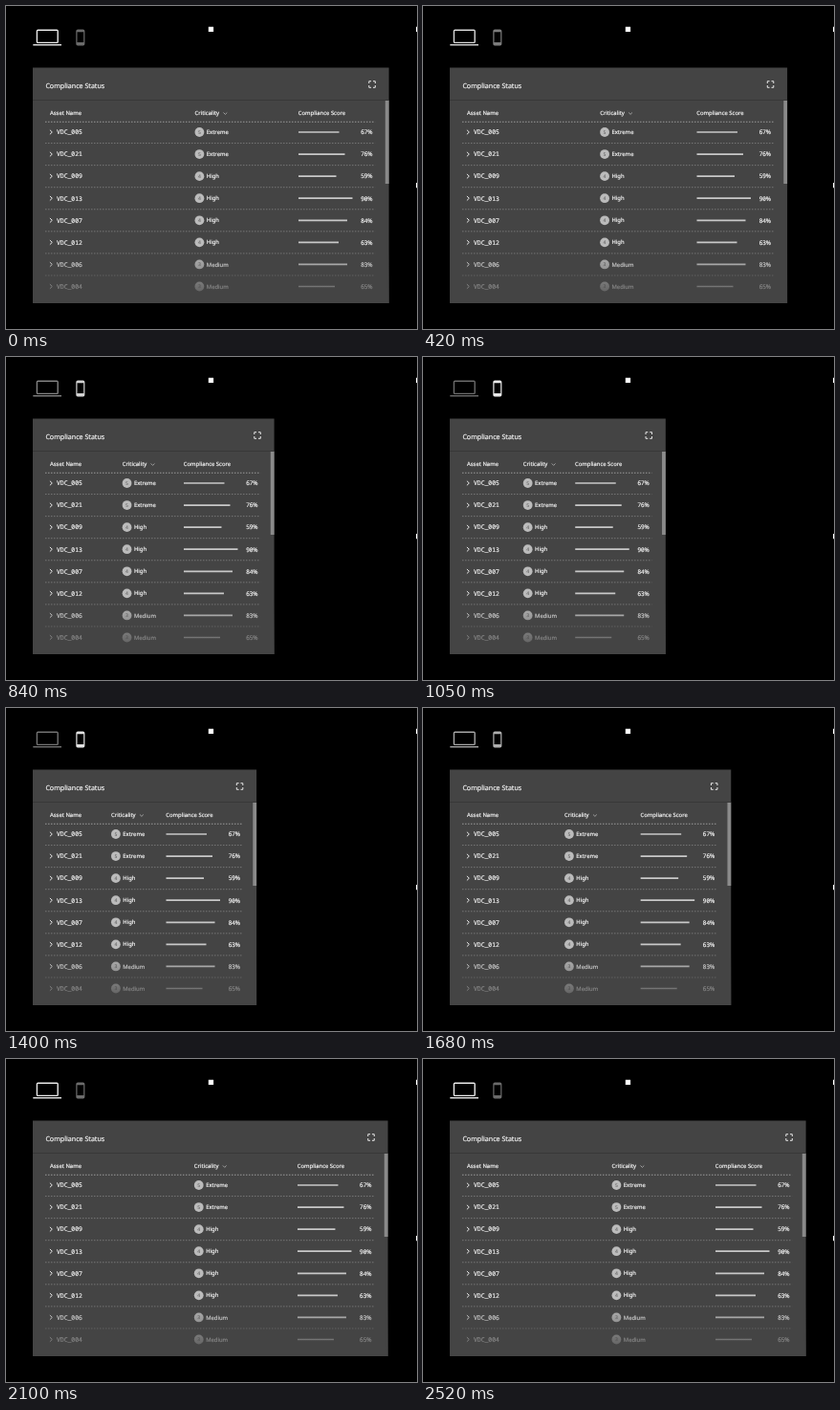
An HTML page that plays this animation: 430x338 px, repeating every 2590 ms.

```html
<!DOCTYPE html>
<html lang="en">
<head>
<meta charset="utf-8">
<title>Responsive compliance table</title>
<style>
  html, body { margin: 0; width: 100%; height: 100%; overflow: hidden; background: #000; }
  svg { display: block; width: 430px; height: 338px; --p: 0; }
  text {
    font: 5.9px "Noto Sans", sans-serif; text-rendering: geometricPrecision;
    fill: #f2f2f2; stroke: #f2f2f2; stroke-width: .2;
  }
  .title { font-size: 7.1px; font-weight: 500; }
  .asset { font: 6.4px "Noto Sans Mono", monospace; }
  .percent { font-size: 6.3px; text-anchor: end; font-feature-settings: "zero"; }
  .digit { font-size: 5px; text-anchor: middle; fill: #555; stroke: none; }
  .line { fill: none; stroke: #f0f0f0; stroke-width: .95; }
  .sort { stroke: #aaa; stroke-width: .9; }
  .bar { stroke: #c8c8c8; stroke-width: 1.7; }
  .rule { stroke: #7c7c7c; stroke-width: .9; stroke-dasharray: 1.5 1.5; }
  .rule.head { stroke: #999; stroke-width: 1.1; }
  .middle { transform: translateX(calc(var(--p) * -93.4px)); }
  .right { transform: translateX(calc(var(--p) * -147.8px)); }
  .laptop { opacity: calc(.92 - .5 * var(--p)); }
  .phone { opacity: calc(.42 + .5 * var(--p)); }
</style>
</head>
<body>
<svg id="stage" viewBox="0 0 430 338">
  <defs>
    <linearGradient id="fade" x1="0" y1="0" x2="0" y2="1">
      <stop offset="0" stop-color="#444" stop-opacity="0"/>
      <stop offset="1" stop-color="#444" stop-opacity=".92"/>
    </linearGradient>
  </defs>
  <path fill="#fff" d="M211.8 21.8h5.3v5.3h-5.3zM429 21.8h1v5.3h-1zM429 185h1v5.3h-1z"/>
  <g class="laptop" fill="none" stroke="#fff" stroke-width="1.4">
    <rect x="32.4" y="25.2" width="21.8" height="13.2" rx="1"/>
    <path d="M28.3 40.7H58"/>
  </g>
  <path class="phone" fill="#fff" fill-rule="evenodd"
    d="M75.1 24.5h5.5q1.8 0 1.8 1.8v13.4q0 1.8-1.8 1.8h-5.5q-1.8 0-1.8-1.8V26.3q0-1.8 1.8-1.8zM74.5 27.3v10.8h6.7V27.3z"/>
  <rect class="panel" x="28" y="64.5" height="246.5" fill="#444"/>
  <rect class="panel" x="28" y="98" height="1" fill="#383838"/>
  <text class="title" x="41.4" y="85.9">Compliance Status</text>
  <text x="46" y="114.2">Asset Name</text>
  <g class="middle" id="middle">
    <text x="197.5" y="114.2">Criticality</text>
    <path class="line sort" d="M227.5 111.5l1.9 1.9 1.9-1.9"/>
  </g>
  <g class="right" id="right">
    <path class="line" d="M379.8 81v-2.3h2.3M384 78.7h2.3V81M386.3 83v2.3H384M382.1 85.3h-2.3V83"/>
    <text x="305.8" y="114.2">Compliance Score</text>
  </g>
  <g id="left"></g>
  <rect class="panel" x="28" y="255" height="56" fill="url(#fade)"/>
  <rect class="right" x="396.8" y="99" width="3.8" height="87" fill="#8a8a8a"/>
</svg>
<script>
  const stage = document.getElementById('stage');
  const columns = Object.fromEntries(
    ['left', 'middle', 'right'].map(id => [id, document.getElementById(id)]));

  function add(column, tag, attributes, content = '') {
    const node = document.createElementNS(stage.namespaceURI, tag);
    for (const name in attributes) node.setAttribute(name, attributes[name]);
    node.textContent = content;
    return columns[column].appendChild(node);
  }

  const levels = { 5: 'Extreme', 4: 'High', 3: 'Medium' };
  // asset, criticality, score, bar length
  const rows = [
    ['005', 5, 67, 42.5], ['021', 5, 76, 48.5], ['009', 4, 59, 39.5], ['013', 4, 90, 56.5],
    ['007', 4, 84, 51], ['012', 4, 63, 42], ['006', 3, 83, 51], ['004', 3, 65, 38]
  ];

  const rules = rows.map(([asset, level, score, length], i) => {
    const y = 132 + i * 23.07;
    const base = y + 2.1;
    add('left', 'path', { class: 'line', d: `M45.9 ${y - 2.3}l2.4 2.3-2.4 2.3` });
    add('left', 'text', { class: 'asset', x: 53, y: base + .2 }, 'VDC_' + asset);
    add('middle', 'circle', { cx: 202.4, cy: y, r: 4.9, fill: '#bbb' });
    add('middle', 'text', { class: 'digit', x: 202.4, y: y + 1.8 }, level);
    add('middle', 'text', { x: 209.8, y: base }, levels[level]);
    add('right', 'path', { class: 'bar', d: `M306 ${y}h${length}` });
    add('right', 'text', { class: 'percent', x: 383.6, y: base + .2 }, score + '%');
    const ruleY = i ? y - 11.5 : 121.3;
    return { y: ruleY, node: add('left', 'path', { class: i ? 'rule' : 'rule head' }) };
  });

  const STEP = 70, STEPS = 37;
  const ease = [0, .006, .026, .063, .132, .23, .345, .47, .591, .709, .812, .9, .96, .993, 1];
  const eased = i => ease[Math.max(0, Math.min(ease.length - 1, i))];
  const panels = document.querySelectorAll('.panel');

  function draw(time) {
    const step = Math.floor(time / STEP) % STEPS;
    const p = eased(step - 2) - eased(step - 17);
    const edge = 400.6 - 147.8 * p;
    stage.style.setProperty('--p', p);
    panels.forEach(panel => panel.setAttribute('width', edge - 28));
    rules.forEach(({ y, node }) => node.setAttribute('d', `M41 ${y}H${edge - 14.5}`));
  }

  let start;
  function tick(now) {
    start ??= now;
    draw(now - start);
    requestAnimationFrame(tick);
  }
  draw(0);
  requestAnimationFrame(tick);
</script>
</body>
</html>
```
